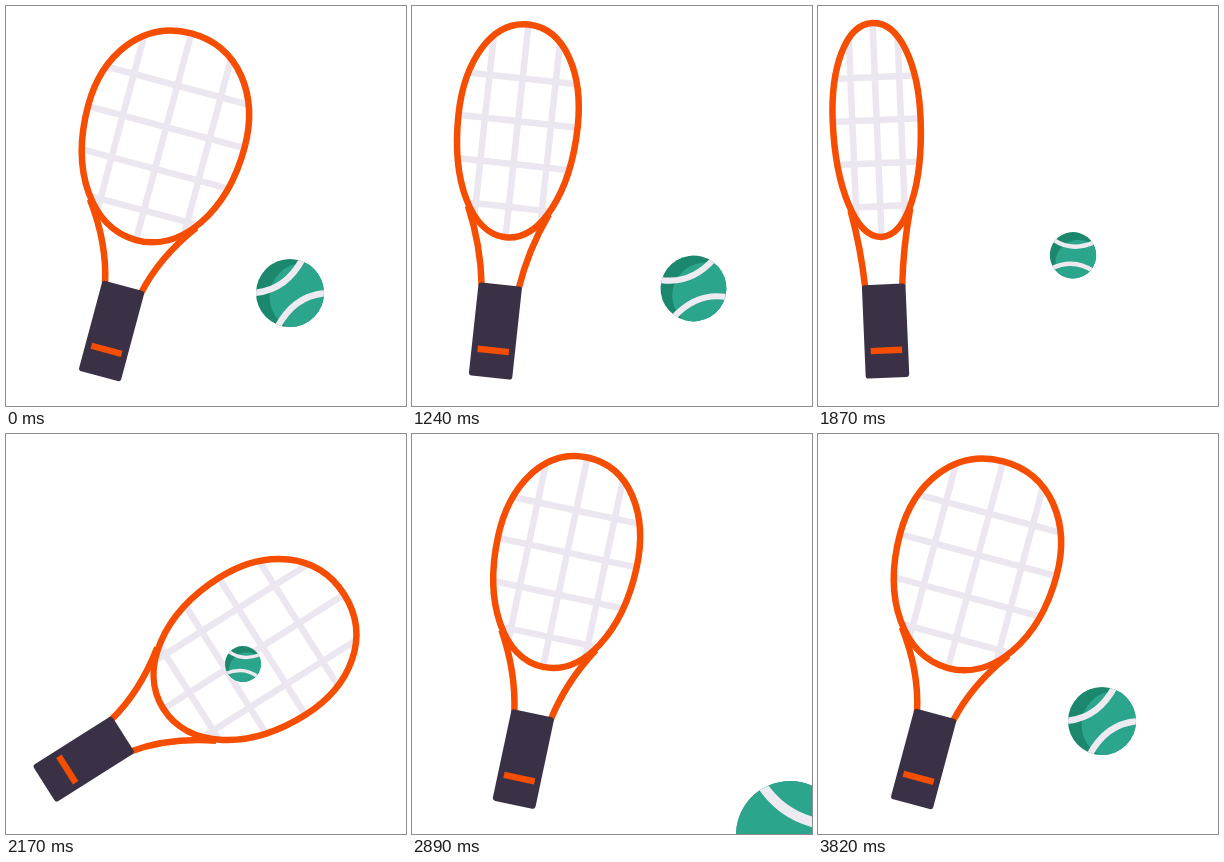
Recreate the animation shown at these times as an HTML page with a canvas. Size 400x400 px, loop 3.85 s.

```html
<!DOCTYPE html>
<html lang="en">
<head>
<meta charset="utf-8">
<title>Tennis racket and ball</title>
<style>
  html, body { margin: 0; width: 100%; height: 100%; overflow: hidden; background: #fff; }
  canvas { display: block; width: 400px; height: 400px; }
</style>
</head>
<body>
<canvas id="stage"></canvas>
<script>
const canvas = document.getElementById('stage');
const ctx = canvas.getContext('2d');
const dpr = window.devicePixelRatio || 1;
canvas.width = canvas.height = 400 * dpr;

const LOOP = 3850, START = 1030, STEP = 30;
const ORANGE = '#f54e00', DARK = '#3b3147', STRING = '#ebe6f0';
const GREEN = '#2ca58d', SHADE = '#1b876d';
const RAD = Math.PI / 180;

// Smooth curve through [time, value] keys, flat at turning points
function track(keys) {
  const n = keys.length;
  const sec = i => (keys[i + 1][1] - keys[i][1]) / (keys[i + 1][0] - keys[i][0]);
  const slopes = keys.map((_, i) => {
    if (i === 0 || i === n - 1) return 0;
    const a = sec(i - 1), b = sec(i);
    return a * b <= 0 ? 0 : 2 * a * b / (a + b);
  });
  return t => {
    if (t <= keys[0][0]) return keys[0][1];
    if (t >= keys[n - 1][0]) return keys[n - 1][1];
    let i = 0;
    while (t > keys[i + 1][0]) i++;
    const [t0, v0] = keys[i], [t1, v1] = keys[i + 1];
    const h = t1 - t0, u = (t - t0) / h, u2 = u * u, u3 = u2 * u;
    return v0 + (v1 - v0) * (3 * u2 - 2 * u3)
      + h * (slopes[i] * (u3 - 2 * u2 + u) + slopes[i + 1] * (u3 - u2));
  };
}

const racket = {
  angle: track([[1000, 15], [1450, -2.9], [1570, -4.2], [1850, -2.8], [1960, 3], [2080, 30],
    [2170, 57.7], [2260, 67], [2400, 70.9], [2500, 71.2], [2600, 71], [2890, 12], [3160, 13.4], [3820, 15]]),
  x: track([[1000, 105.5], [1450, 63.5], [1570, 62.5], [2170, 77.5], [2530, 93.7],
    [2620, 103], [2890, 111.3], [3160, 108], [3820, 105.5]]),
  half: track([[1000, 81], [1450, 40.3], [1570, 38.8], [1850, 43], [2080, 74], [2170, 81],
    [2530, 43.5], [2600, 41], [2890, 71], [3160, 78], [3820, 81]])
};

const HIT = 2180, REENTER = 2700;
const approach = {
  x: track([[1000, 284], [1450, 277], [1540, 273.6], [2170, 237], [HIT, 236.5]]),
  y: track([[1000, 287], [1450, 275], [1540, 270.5], [2170, 230], [HIT, 229.5]]),
  r: track([[1000, 34], [1450, 31], [1540, 29.6], [2170, 18], [HIT, 17.9]]),
  rot: track([[1000, 0], [1450, 29], [2170, 41], [HIT, 41]])
};

function ballAt(t) {
  if (t < HIT) {
    return { x: approach.x(t), y: approach.y(t), r: approach.r(t), rot: approach.rot(t) };
  }
  if (t < REENTER) {
    const u = (t - HIT) / 350;
    return { x: 236.5 - 248.5 * u, y: 229.5 + 169.5 * u, r: 17.9 + 29.1 * u, rot: 41 - 131 * u };
  }
  const k = Math.pow(Math.max(0, 3820 - t) / 930, 3.8);
  return { x: 284 + 94 * k, y: 287 + 114 * k, r: 34 + 20 * k, rot: -119.4 * k };
}

function headPath(a) {
  const top = -308.5, mid = -212, low = -94.5;
  ctx.beginPath();
  ctx.moveTo(0, top);
  ctx.bezierCurveTo(a * .62, top, a, -265, a, mid);
  ctx.bezierCurveTo(a, -144, a * .57, low, 0, low);
  ctx.bezierCurveTo(-a * .57, low, -a, -144, -a, mid);
  ctx.bezierCurveTo(-a, -265, -a * .62, top, 0, top);
  ctx.closePath();
}

function drawRacket(t) {
  const a = racket.half(t);
  ctx.save();
  ctx.translate(racket.x(t), 325.3);
  ctx.rotate(racket.angle(t) * RAD);
  ctx.lineWidth = 6.5;

  // strings
  ctx.save();
  headPath(a);
  ctx.clip();
  ctx.strokeStyle = STRING;
  ctx.beginPath();
  for (let i = -1; i <= 1; i++) {
    ctx.moveTo(i * a * .555, -320);
    ctx.lineTo(i * a * .555, -85);
  }
  for (let i = 0; i < 4; i++) {
    ctx.moveTo(-a, -254.4 + 43.1 * i);
    ctx.lineTo(a, -254.4 + 43.1 * i);
  }
  ctx.stroke();
  ctx.restore();

  // frame and throat
  ctx.strokeStyle = ORANGE;
  headPath(a);
  ctx.stroke();
  const end = a * .68;
  for (const s of [-1, 1]) {
    ctx.beginPath();
    ctx.moveTo(s * 18.5, -44);
    ctx.quadraticCurveTo(s * (18.5 + .23 * (end - 18.5)), -84, s * end, -122);
    ctx.stroke();
  }

  // handle
  ctx.fillStyle = DARK;
  ctx.beginPath();
  ctx.roundRect(-21.8, -47, 43.6, 93.5, 3);
  ctx.fill();
  ctx.fillStyle = ORANGE;
  ctx.fillRect(-15.7, 16, 31.4, 6.4);
  ctx.restore();
}

function disc(x, y, r, color) {
  ctx.fillStyle = color;
  ctx.beginPath();
  ctx.arc(x, y, r, 0, 2 * Math.PI);
  ctx.fill();
}

function drawBall(t) {
  const b = ballAt(t);
  ctx.save();
  ctx.translate(b.x, b.y);
  ctx.rotate(b.rot * RAD);
  ctx.scale(b.r / 34, b.r / 34);
  ctx.beginPath();
  ctx.arc(0, 0, 34, 0, 2 * Math.PI);
  ctx.clip();
  disc(0, 0, 36, SHADE);
  disc(13.5, 4, 34, GREEN);
  ctx.strokeStyle = '#eeeaf2';
  ctx.lineWidth = 6.4;
  for (const s of [-1, 1]) {
    ctx.beginPath();
    ctx.moveTo(s * 37, 0);
    ctx.quadraticCurveTo(s * 4, s * 2, s * -13, s * 35);
    ctx.stroke();
  }
  ctx.restore();
}

function render(now) {
  const time = now % LOOP;
  const t = time < START ? 0 : START + Math.floor((time - START) / STEP) * STEP;
  ctx.setTransform(dpr, 0, 0, dpr, 0, 0);
  ctx.fillStyle = '#fff';
  ctx.fillRect(0, 0, 400, 400);
  drawRacket(t);
  drawBall(t);
}

let origin = null;
function tick(now) {
  if (origin === null) origin = now;
  render(now - origin);
  requestAnimationFrame(tick);
}
render(0);
requestAnimationFrame(tick);
</script>
</body>
</html>
```
